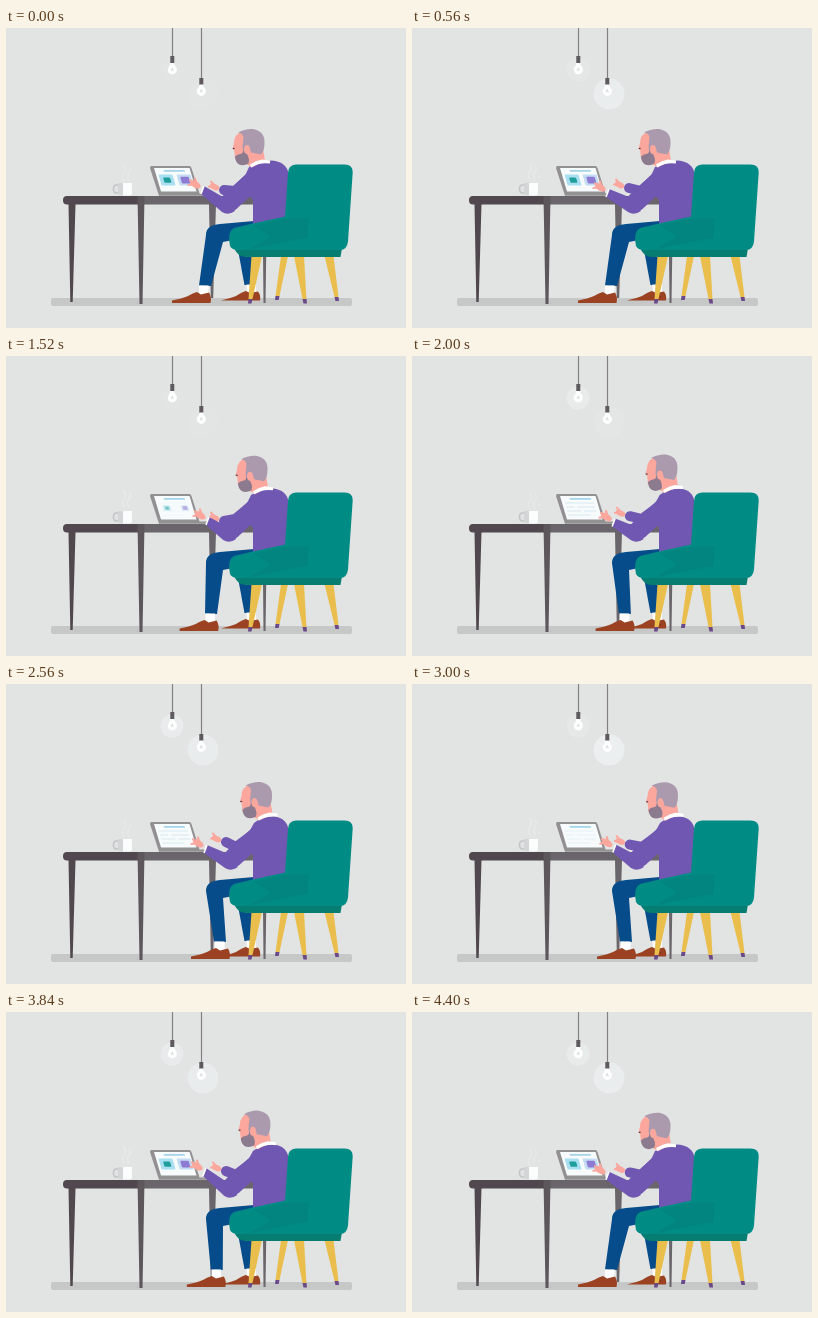
These frames come from a looping animation (400 px wide and 300 px high, 4480 ms). An HTML page:

```html
<!DOCTYPE html>
<html lang="en">
<head>
<meta charset="utf-8">
<title>Working at the desk</title>
<style>
html, body { margin: 0; width: 100%; height: 100%; overflow: hidden; background: #e2e4e3; }
svg { display: block; width: 100vw; height: 100vh; }
.dark { fill: #51484f; }
.skin { fill: #fba79d; }
.finger { fill: none; stroke: #fba79d; stroke-linecap: round; }
.shoe { fill: #9a4222; }
.jeans { fill: #064c8a; }
.knit { fill: #7057b1; }
.limb { fill: none; stroke: #7057b1; stroke-linecap: round; stroke-linejoin: round; }
.wood { fill: #e9be4c; }
.tip { fill: #69498a; }
.steam { fill: none; stroke: #f1f3f2; stroke-width: 1.4; stroke-linecap: round; animation: drift 1.12s ease-in-out infinite alternate; }
@keyframes drift { from { transform: translateY(1px); opacity: .3; } to { transform: translateY(-2px); opacity: .55; } }
</style>
</head>
<body>
<svg viewBox="0 0 400 300">
  <rect width="400" height="300" fill="#e2e4e3"/>
  <rect x="45" y="270" width="301" height="8" rx="2" fill="#c6c7c7"/>

  <!-- lamps -->
  <g>
    <circle id="glowA" cx="166" cy="42" r="11.500" fill="#f0f4f5"/>
    <circle id="glowB" cx="197" cy="66" r="15.500" fill="#f0f4f5"/>
    <path d="M166.500 0V29M195.500 0V51" stroke="#828083" stroke-width="1.200"/>
    <path fill="#5f5a5f" d="M164.300 28h4v7h-4zM193.300 50h4v7h-4z"/>
    <path id="bulb" fill="#fdfefe" d="M164.300 35h4q0 2 1.300 3.600a4.600 4.600 0 1 1-6.600 0Q164.300 37 164.300 35z"/>
    <use href="#bulb" x="29" y="21.500"/>
    <path d="M165.300 43l1-3 1 3M194.300 64.500l1-3 1 3" fill="none" stroke="#c9cfd2" stroke-width=".7"/>
  </g>

  <!-- rear chair legs and table -->
  <path class="wood" d="M275 228h7l-8.500 40h-4z"/>
  <path class="tip" d="M269.500 268h4l-.8 4h-3.700z"/>
  <path class="dark" d="M62.500 176h7l-2.800 98h-2.400z"/>
  <path fill="#69656a" d="M203 176h7l-2.800 94h-2.400zM256.500 176h4.500l-1.500 99h-2z"/>
  <path class="dark" d="M61 168h72v8.500H61q-4 0-4-4v-.5q0-4 4-4z"/>
  <path fill="#69656a" d="M132 168h130v8.500H132z"/>
  <path fill="#5d565b" d="M131.500 168h7l-2 108h-3z"/>

  <!-- cup -->
  <path class="steam" d="M118 152q-3-4 0-8t0-8M123 152q-3-4 0-8t0-6"/>
  <path fill="none" stroke="#c3c6c6" stroke-width="1.600" d="M113 157h-2.500q-3 0-3 4t3 4h4"/>
  <path fill="#fbfcfc" d="M112 155h14v10q0 2.500-2.500 2.500h-9q-2.500 0-2.500-2.500z"/>
  <path fill="#d3d6d6" d="M112 155h5v12.500h-2.500q-2.500 0-2.500-2.500z"/>

  <!-- laptop -->
  <path fill="#929093" d="M145.500 138H183q2 0 2.500 2l8 25.500H205v2.300h-52L144 140q0-2 1.500-2z"/>
  <path fill="#f8fbfc" d="M148 140h35.500l7 23.500H155z"/>
  <g transform="translate(147 140) skewX(16)">
    <path fill="#a5d4e9" d="M10 2h21v1.700H10z"/>
    <path id="rows" fill="none" stroke="#b9d7e6" stroke-width=".8" d="M4 7h29M4 11h8M15 11h18M4 15h14M21 15h12M4 19h22"/>
    <g id="cardA">
      <rect x="-7" y="-5.500" width="14" height="11" rx="1" fill="#a9dff0"/>
      <rect x="-3.300" y="-2.600" width="7" height="5.400" rx="1" fill="#1f9f9c"/>
    </g>
    <g id="cardB">
      <rect x="-7" y="-5.500" width="14" height="11" rx="1" fill="#c3dcf4"/>
      <rect x="-4" y="-3.200" width="8.500" height="6.800" rx="1" fill="#8d7ad2"/>
    </g>
  </g>

  <!-- man -->
  <path id="farArm" class="limb" stroke-width="10"/>
  <g id="farHand">
    <ellipse class="skin" cy="1" rx="5" ry="2.900" transform="rotate(25)"/>
    <path class="finger" d="M-1-1l-3-3.500M-3 1l-3-.5" stroke-width="2"/>
  </g>
  <path class="jeans" d="M230 210h16L249 257h-10.500L232 222z"/>
  <path fill="#fff" d="M240.500 256.500h9.500v9h-9z"/>
  <path class="shoe" d="M215 272.500q9-2 15-4.500 6-4 10-5l4 2 8-1.500q3 4 2 9z"/>
  <path id="nearLeg" class="jeans"/>
  <path id="nearSock" fill="#fff"/>
  <path id="nearShoe" class="shoe" d="M166 275v-2.500q10-2 16-4.500 5-3 9-4l4 2.500 8-2q3 5 1.500 10.500z"/>
  <path id="torso" class="knit"/>
  <g id="head">
    <path class="skin" d="M237 103q-9 3-9 12l-1.600 5.500 1.800 2 .8 8 14 7 3 2 13-7-2-12-6-17z"/>
    <path fill="#ab9aae" d="M232 104.500q7-4 15-3.500 12 2 11.500 14 0 8-3.500 11.500l-10-2q-1-7-5-5l-2.500 5.500-1-6 1-10q-1-4-5.500-4.500z"/>
    <path fill="#8c7b8e" d="M229 128.500q2.500-2.500 5-2.500 3 0 3.500-4l3.500 4q3 5 1.500 9.500-5 3-9.500 1-4-3-4-8z"/>
    <ellipse class="skin" cx="241" cy="121.500" rx="2.900" ry="4.500"/>
    <path d="M226.800 120.500h1.800" stroke="#4d3c46" stroke-width="1.200"/>
    <path fill="#fff" d="M244 136.500q6-4 12-5l8 1v3q-10-1.500-19 4z"/>
  </g>
  <path id="upperArm" class="limb" stroke-width="19"/>
  <path id="foreArm" class="knit"/>
  <path id="cuff" stroke="#fff" stroke-width="1.600"/>
  <g id="nearHand">
    <ellipse class="skin" cx="1" cy="1" rx="6" ry="3.300" transform="rotate(32)"/>
    <path class="finger" d="M-1-1l-4-1.500M-3 1.500l-3.500.5M1-1l-1-3.500" stroke-width="2.200"/>
  </g>

  <!-- chair -->
  <path class="wood" d="M245.500 228h10.500l-9.500 43h-4zM288 228h10l2.500 43h-4zM318.500 228h9l5 41h-4z"/>
  <path class="tip" d="M242.500 271h4l-1 4.500h-3.500zM296.500 271h4l.5 4.500h-3.500zM328.500 269h4l.5 4h-3.500z"/>
  <path fill="#077d72" d="M228 220H336l-1.500 9H240q-8 0-12-9z"/>
  <path fill="#008c85" d="M282 145q0-8 8-8.500h48.500q8.500 0 8.200 8l-4.700 69q-1 8.500-8 8.500H232q-6 0-8-4-3-14 4-18l19-4.500 32-7z"/>
  <path fill="#067a78" opacity=".4" d="M248 197.500l32-7 23-.5-1.500 20-22 4-39 8 24-13z"/>
</svg>
<script>
const LOOP = 4480;
const $ = id => document.getElementById(id);
const mix = (a, b, k) => a + (b - a) * k;
const ramp = (t, a, b) => {
  const u = Math.min(1, Math.max(0, (t - a) / (b - a)));
  return u * u * (3 - 2 * u);
};
const set = (id, name, value) => $(id).setAttribute(name, value);
const path = (id, d) => set(id, 'd', d);
const move = (id, x, y, extra = '') => set(id, 'transform', `translate(${x} ${y}) ${extra}`);

// Rows: time, near hand x y, far hand x y, glow A, glow B
const track = [
  [0, 189, 155, 209, 158, .1, .1],
  [560, 188, 158, 208, 156, .2, .6],
  [1520, 194, 158, 209, 161, .1, .1],
  [2560, 192, 158, 211, 154, .5, .5],
  [3400, 196, 155, 208, 161, .35, .55],
  [3840, 191, 153, 211, 155, .45, .5],
  [4480, 188, 158, 208, 156, .45, .55]
];

function sample(t) {
  const i = Math.max(1, track.findIndex(row => t < row[0]));
  const a = track[i - 1], b = track[i];
  const u = (t - a[0]) / (b[0] - a[0]);
  return { v: a.map((n, k) => mix(n, b[k], u)), swing: Math.sin(Math.PI * u) };
}

function drawLeg(lean) {
  const hem = 15 * lean, sock = 16 * lean;
  path('nearLeg', `M248 193L214 196Q200 197 200 207L${193 + hem} 257.500l12 .5L217 214L232 211L248 208z`);
  path('nearSock', `M${193 + sock} 257.500h9.500v8q-5 3-9.500 0z`);
  move('nearShoe', 19 * lean, 0);
}

function drawArms(nx, ny, fx, fy, lean) {
  const ex = 222 + 3 * lean, ey = 177;
  const cx = nx + 9, cy = ny + 7;
  path('farArm', `M${245 + 4 * lean} 149L${229 + lean} 163L${fx + 9} ${fy + 4}`);
  move('farHand', fx, fy);
  path('upperArm', `M${254 + 4 * lean} 146L${ex + 2} ${ey - 3}`);
  path('foreArm', `M${cx} ${cy - 4}L${ex - 5} ${ey - 8}L${ex + 7} ${ey + 6}Q${ex} ${ey + 11} ${ex - 6} ${ey + 7}L${cx - 3} ${cy + 4}z`);
  path('cuff', `M${cx} ${cy - 4}L${cx - 3} ${cy + 4}`);
  move('nearHand', nx, ny);
}

function drawCard(id, x, size) {
  move(id, x, 12, `scale(${size})`);
  set(id, 'opacity', Math.min(1, size * 1.2));
}

function draw(t) {
  const { v, swing } = sample(t);
  const tap = swing * Math.sin(t * Math.PI * 2 / 320);
  const lean = ramp(t, 1000, 2200) - ramp(t, 3600, 4400);

  drawLeg(lean);
  path('torso', `M${243 + 5 * lean} 139Q255 133 ${266 + 2 * lean} 132.500Q281 134 282.500 146L280 193L247 199V172Q${238 + 4 * lean} 164 ${238 + 4 * lean} 150z`);
  move('head', 7.5 * lean, -3 * lean + .4 * tap);
  drawArms(v[1] + tap, v[2] + 1.6 * tap, v[3] - tap, v[4] - 1.6 * tap, lean);

  const out = 1 - ramp(t, 1250, 1800);
  drawCard('cardA', 10.6, out + ramp(t, 3050, 3350));
  drawCard('cardB', 28.6, out + ramp(t, 3450, 3750));
  set('rows', 'opacity', .6 * (ramp(t, 1350, 1900) - ramp(t, 2900, 3150)));

  const flicker = .15 * swing * Math.sin(t * Math.PI * 2 / 280);
  set('glowA', 'opacity', Math.max(0, v[5] + flicker));
  set('glowB', 'opacity', Math.max(0, v[6] - flicker));
}

const start = performance.now();
function frame(now) {
  draw(Math.max(0, now - start) % LOOP);
  requestAnimationFrame(frame);
}
draw(0);
requestAnimationFrame(frame);
</script>
</body>
</html>
```
